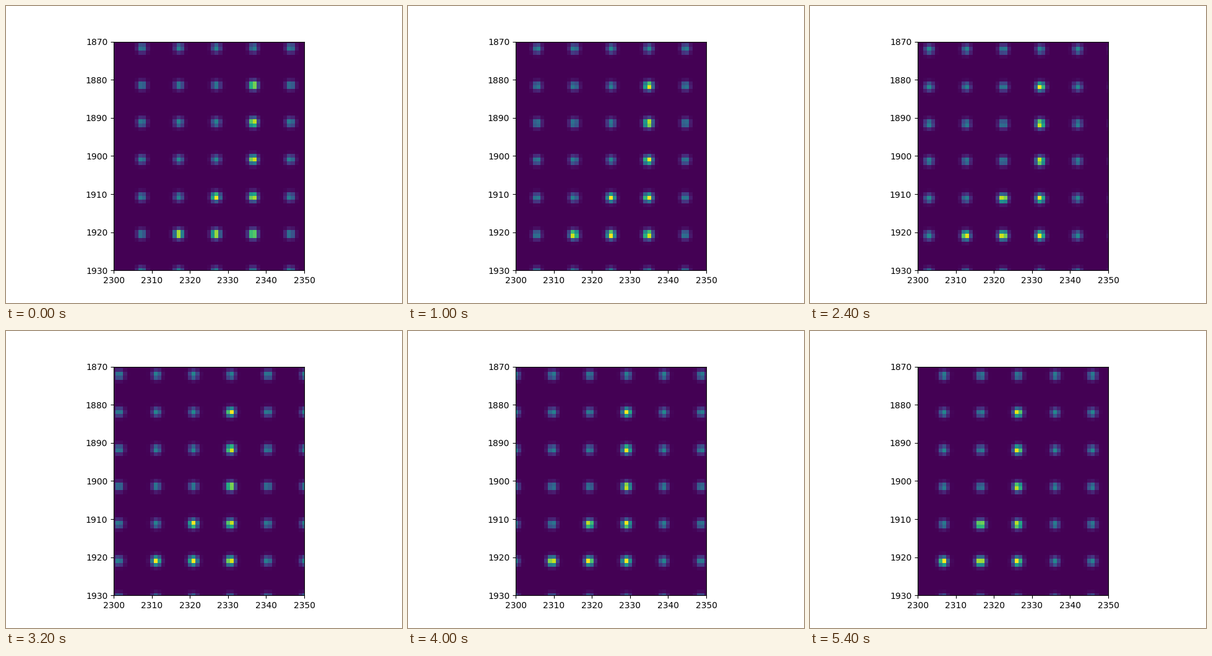
A matplotlib script that plays this animation: 640x480 px, repeating every 5600 ms.

```python
import numpy as np
import matplotlib.pyplot as plt
from matplotlib.animation import FuncAnimation

FRAMES, STEP_MS = 28, 200
X0, X1, Y0, Y1 = 2300, 2350, 1870, 1930
PITCH_X, PITCH_Y = 9.74, 9.75
SIGMA = 0.78
DIM, BRIGHT = 0.47, 1.05

xs = np.arange(X0, X1 + 1)
ys = np.arange(Y0, Y1 + 1)[:, None]

# Lit spots form a mirrored "L"-like staircase in the grid (column, row)
lit = {(3, r) for r in range(1, 6)} | {(2, 4), (2, 5), (1, 5)}


def blob(cx, cy):
    d2 = (xs - cx) ** 2 + (ys - cy) ** 2
    core = np.exp(-d2 / (2 * SIGMA ** 2))
    wing = 0.015 * np.exp(-d2 / (2 * 1.6 ** 2))
    return core + wing


def spots(k):
    """Spot grid after k steps: drifts left, and slightly down while slowing."""
    dx = -0.355 * k - 0.001 * k ** 2
    dy = 0.04 * k - 0.0006 * k ** 2
    img = np.zeros((ys.size, xs.size))
    for col in range(-1, 7):
        for row in range(7):
            cx = 2307.45 + PITCH_X * col - 0.025 * row + dx
            cy = 1871.75 + PITCH_Y * row + dy
            img += (BRIGHT if (col, row) in lit else DIM) * blob(cx, cy)
    return img


fig, ax = plt.subplots(figsize=(6.4, 4.8), dpi=100)
image = ax.imshow(spots(0), cmap="viridis", vmin=0, vmax=1,
                  interpolation="nearest",
                  extent=(X0 - 0.5, X1 + 0.5, Y1 + 0.5, Y0 - 0.5))
ax.set_xlim(X0, X1)
ax.set_ylim(Y1, Y0)
ax.set_xticks(range(X0, X1 + 1, 10))
ax.set_yticks(range(Y0, Y1 + 1, 10))


def update(k):
    image.set_data(spots(k))
    return [image]


anim = FuncAnimation(fig, update, frames=FRAMES, interval=STEP_MS,
                     repeat=True, repeat_delay=0)
plt.show()
```
